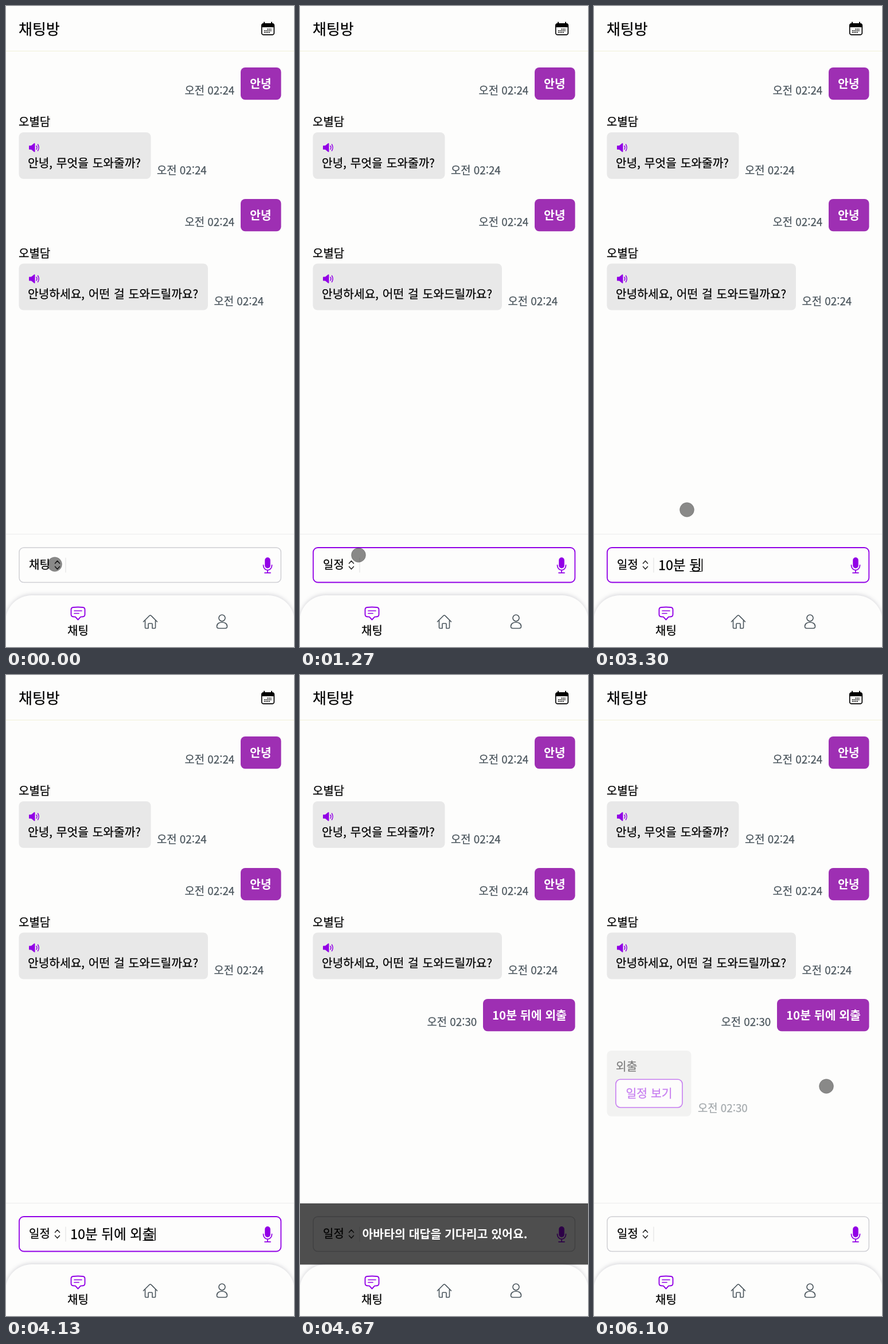
These frames come from a looping animation (502 by 1116 pixels, 6130 ms). An HTML page:

```html
<!DOCTYPE html>
<html lang="ko">
<head>
<meta charset="utf-8">
<title>채팅방</title>
<style>
  html, body { margin: 0; width: 100%; height: 100%; overflow: hidden; background: #fdfdfc; }
  svg { display: block; width: 100%; height: 100%; }
  text { font-family: "Noto Sans CJK KR", "Noto Sans KR", "Noto Sans CJK", sans-serif; white-space: pre; }
  .nav { filter: drop-shadow(0 -2px 3px rgba(40, 40, 70, .16)); }
  .line { fill: none; stroke-linecap: round; stroke-linejoin: round; }
</style>
</head>
<body>
<svg id="stage" viewBox="0 0 502 1116" preserveAspectRatio="none"></svg>
<script>
const LOOP = 6130;
const VIOLET = '#9200e6', BUBBLE = '#9e2fb3', GREY = '#e8e8e8', SLATE = '#4a555c', PAPER = '#fdfdfc';
const INPUT_X = 112, INPUT_SIZE = 23.5;

// y is the middle of the line of text; a hairline stroke gives a medium weight
const text = (x, y, s, size = 20.3, fill = '#000', extra = '') =>
  `<text x="${x}" y="${y + size * 0.37}" font-size="${size}" fill="${fill}" stroke="${fill}" stroke-width=".25" ${extra}>${s}</text>`;
const boldText = (x, y, s) => text(x, y, s, 20.5, '#fff', 'font-weight="600" stroke-opacity="0"');
const box = (x, y, w, h, fill, extra = '') =>
  `<rect x="${x}" y="${y}" width="${w}" height="${h}" rx="8" fill="${fill}" ${extra}/>`;
const line = (d, color, width, extra = '') =>
  `<path class="line" d="${d}" stroke="${color}" stroke-width="${width}" ${extra}/>`;
const stamp = (x, y, s) => text(x, y, '오전 ' + s, 18.8, SLATE);

const speaker = (x, y) => `<g transform="translate(${x} ${y})">
  <path d="M1 5H4L9 1Q10.5 0 10.5 2V15Q10.5 17 9 16L4 12H1Q0 12 0 11V6Q0 5 1 5Z" fill="${VIOLET}"/>
  ${line('M13 5.5Q15 8.5 13 11.5M15.5 3Q19 8.5 15.5 14', VIOLET, 1.5)}</g>`;

const sent = (x, y, s, time) => box(x, y, 479.5 - x, 56.3, BUBBLE) +
  boldText(x + 16, y + 28, s) + stamp(x - 97.5, y + 40.3, time);

const reply = (y, w, s) => text(22, y - 18, '오별담', 20) + box(22.5, y, w, 81, GREY) +
  speaker(40, y + 18) + text(38, y + 53, s, 20.3, '#000', 'word-spacing="1.2"') +
  stamp(w + 33, y + 66, '02:24');

const calendar = () => {
  let dots = '';
  for (let r = 0; r < 3; r++)
    for (let c = 0; c < 5; c++)
      if (!(r === 0 && c < 2) && !(r === 2 && c > 3))
        dots += `<rect x="${450 + c * 2.7}" y="${39.5 + r * 2.8}" width="1.7" height="1.6"/>`;
  return `<rect x="445.7" y="31" width="21.6" height="19.2" rx="3.5" fill="${PAPER}" stroke="#000" stroke-width="1.7"/>
    <path d="M445 37V34Q445 30 449 30H464Q468 30 468 34V37Z"/>
    ${line('M450 28.5V32M463 28.5V32', '#000', 2)}${dots}`;
};

const mic = `<rect x="451.2" y="960" width="9.6" height="19" rx="4.8" fill="${VIOLET}"/>` +
  line('M448.5 973.5C448.5 985 463.5 985 463.5 973.5M456 982.5V986.5M451 986.8H461', VIOLET, 1.8);

const chatIcon = line('M117 1047Q125.5 1046 134 1047Q137.5 1047.5 137.5 1051V1059Q137.5 1063 134 1063.3' +
  'L130 1063.6L125.5 1068.5L121 1063.6L117 1063.3Q113.5 1063 113.5 1059V1051Q113.5 1047.5 117 1047Z', VIOLET, 1.9) +
  line('M119 1053H132M119 1057.5H127', VIOLET, 1.7);
const homeIcon = line('M239.5 1072L250 1061.5Q251.5 1060 253 1061.5L263.5 1072M242.5 1069.5V1082' +
  'Q242.5 1083.5 244 1083.5H248V1076Q248 1075 249 1075H254Q255 1075 255 1076V1083.5H259Q260.5 1083.5 260.5 1082V1069.5', SLATE, 1.6);
const userIcon = `<circle class="line" cx="376.5" cy="1065.5" r="5.5" stroke="${SLATE}" stroke-width="1.6"/>` +
  line('M370.5 1074.5Q376.5 1071.5 382.5 1074.5Q385.5 1076.5 385.5 1080Q385.5 1083.5 382 1083.5' +
  'H371Q367.5 1083.5 367.5 1080Q367.5 1076.5 370.5 1074.5Z', SLATE, 1.6);

const stage = document.getElementById('stage');
stage.innerHTML = `
  <rect width="502" height="1116" fill="${PAPER}"/>
  ${text(22, 40.5, '채팅방', 26)}
  ${calendar()}
  ${line('M0 78.5H502', '#f0f0d8', 1)}
  ${sent(409, 107, '안녕', '02:24')}
  ${reply(220, 230, '안녕, 무엇을 도와줄까?')}
  ${sent(409, 336, '안녕', '02:24')}
  ${reply(448.5, 329.5, '안녕하세요, 어떤 걸 도와드릴까요?')}
  <g id="mine">${sent(319, 564, '10분 뒤에 외출', '02:30')}</g>
  <g id="answer">
    ${box(22.5, 654, 147, 114.5, GREY)}
    ${text(38, 681.5, '외출')}
    ${box(38, 704, 116, 49, PAPER, `stroke="${VIOLET}" stroke-width="1.6"`)}
    ${text(55.5, 728, '일정 보기', 20.5, VIOLET)}
    ${stamp(181, 754, '02:30')}
  </g>
  ${line('M0 919.5H502', '#ececec', 1)}
  ${box(23, 943, 456.3, 60.5, PAPER, 'id="field"')}
  ${text(40, 973, '채팅', 20, '#000', 'id="mode"')}
  ${line('M85.5 970.5L89.5 966L93.5 970.5M85.5 976L89.5 980.5L93.5 976', '#222', 1.5)}
  ${line('M104 961V986', '#dedede', 1)}
  ${text(INPUT_X, 973, '', INPUT_SIZE, '#000', 'id="typed"')}
  ${line('', '#000', 1.2, 'id="under"')}
  ${line('', '#000', 1.6, 'id="caret"')}
  ${mic}
  <rect class="nav" x="-1" y="1026" width="504" height="140" rx="46" fill="${PAPER}"/>
  <g id="wait">
    <rect y="920" width="502" height="106.5" fill="#000" fill-opacity=".69"/>
    ${boldText(108.5, 973, '아바타의 대답을 기다리고 있어요.')}
  </g>
  ${chatIcon}${homeIcon}${userIcon}
  ${text(107, 1088, '채팅', 20)}
  <circle id="dot" r="12.5" fill="#000" fill-opacity=".46" stroke="#000" stroke-opacity=".2"/>`;

const el = {};
for (const node of stage.querySelectorAll('[id]')) el[node.id] = node;

// time, finished text, syllable being composed
const keys = [
  [0, '', ''], [1800, '1', ''], [1950, '10', ''],
  [2200, '10', 'ㅂ'], [2330, '10', '부'], [2450, '10', '분'], [2700, '10분 ', ''],
  [2850, '10분 ', 'ㄷ'], [2970, '10분 ', '두'], [3080, '10분 ', '뒤'], [3250, '10분 ', '뒹'],
  [3390, '10분 뒤', '에'], [3500, '10분 뒤에 ', ''],
  [3610, '10분 뒤에 ', 'ㅇ'], [3710, '10분 뒤에 ', '오'], [3800, '10분 뒤에 ', '외'],
  [3900, '10분 뒤에 ', '욏'], [4000, '10분 뒤에 외', '추'], [4100, '10분 뒤에 외', '출'],
  [4230, '', '']
];
// time, x, y of the pointer
const path = [
  [0, 85, 972], [150, 89, 973], [1150, 89, 973], [1600, 162, 877],
  [5700, 162, 877], [5701, 330, 790], [6000, 405, 716], [LOOP, 405, 716]
];
const FOCUS = 600, MODE = 1000, SEND = 4230, DONE = 5760, ANSWER = 5900, FADE = 400;

const clamp = v => Math.max(0, Math.min(1, v));
const ease = v => v * v * (3 - 2 * v);
const show = (node, on) => node.setAttribute('visibility', on ? 'visible' : 'hidden');
const put = (node, s) => { if (node.textContent !== s) node.textContent = s; };
const widths = {};
function widthOf(s) {
  if (!s) return 0;
  if (!(s in widths)) {
    put(el.typed, s);
    widths[s] = el.typed.getComputedTextLength();
  }
  return widths[s];
}

function render(t) {
  const focused = t >= FOCUS && t < SEND;
  el.field.setAttribute('stroke', focused ? VIOLET : '#cfcfd4');
  el.field.setAttribute('stroke-width', focused ? 1.8 : 1.5);
  put(el.mode, t < MODE ? '채팅' : '일정');

  const [, done, draft] = keys.filter(k => k[0] <= t).pop();
  const start = INPUT_X + widthOf(done), end = INPUT_X + widthOf(done + draft);
  put(el.typed, done + draft);
  el.under.setAttribute('d', `M${start + 1} 984.5H${end - 1}`);
  show(el.under, draft);
  el.caret.setAttribute('d', `M${end + 0.5} 963V984`);
  show(el.caret, focused && !(t >= FOCUS + 500 && t < FOCUS + 1000));

  show(el.wait, t >= SEND && t < DONE);
  el.mine.setAttribute('opacity', clamp((t - SEND) / FADE));
  el.answer.setAttribute('opacity', clamp((t - ANSWER) / FADE));

  const i = path.findIndex(p => p[0] > t);
  const a = path[i - 1], b = path[i];
  const k = ease((t - a[0]) / (b[0] - a[0]));
  el.dot.setAttribute('cx', a[1] + (b[1] - a[1]) * k);
  el.dot.setAttribute('cy', a[2] + (b[2] - a[2]) * k);
  show(el.dot, t < 3700 || t >= DONE);
}

const origin = performance.now();
function tick() {
  render((performance.now() - origin) % LOOP);
  requestAnimationFrame(tick);
}
tick();
</script>
</body>
</html>
```
